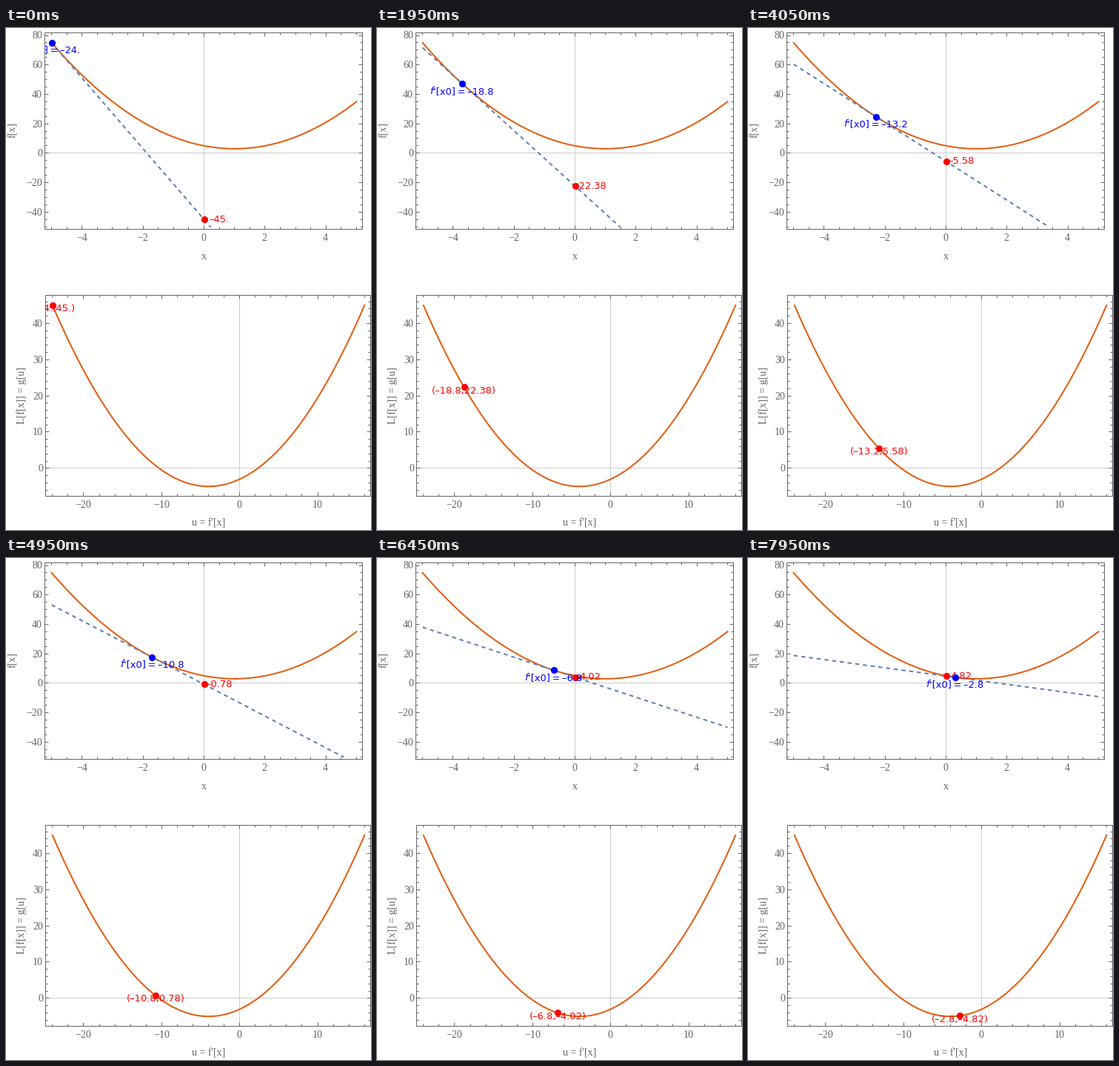
Write a matplotlib script that moves like this. It is 493 by 677 pixels and loops after 8000 ms.

```python
import matplotlib.pyplot as plt
import numpy as np
from matplotlib.animation import FuncAnimation
from matplotlib.ticker import MultipleLocator
from matplotlib.transforms import Affine2D

W, H, DPI = 493, 677, 64
PX = 72 / DPI  # points per pixel
GRAY, LIGHT = "#666666", "#cccccc"
ORANGE, STEEL = "#e65c0e", "#5e81b5"
FRAME_MS, LOOP_MS, STEP_MS = 50, 8000, 150
TANGENT_FLOOR = -50.3

plt.rcParams["font.family"] = "Liberation Serif"
plt.rcParams["axes.unicode_minus"] = True

fig = plt.figure(figsize=(W / DPI, H / DPI), dpi=DPI, facecolor="white")


def f(x):
    return 2 * x**2 - 4 * x + 5


def slope(x):
    return 4 * x - 4


def legendre(u):
    return (u + 4) ** 2 / 8 - 5


def number(value):
    """Short decimal with a trailing point on whole numbers and an en dash."""
    text = f"{round(value, 2):g}"
    return (text if "." in text else text + ".").replace("-", "\u2013")


def make_plot(box, origin, scale, x_steps, y_steps):
    """Framed axes; box and origin in stage pixels, scale in pixels per unit."""
    left, top, right, bottom = box
    (ox, oy), (sx, sy) = origin, scale
    ax = fig.add_axes([left / W, 1 - bottom / H, (right - left) / W, (bottom - top) / H])
    ax.set(xlim=((left - ox) / sx, (right - ox) / sx),
           ylim=((oy - bottom) / sy, (oy - top) / sy), facecolor="none")
    for axis, (major, minor) in ((ax.xaxis, x_steps), (ax.yaxis, y_steps)):
        axis.set_major_locator(MultipleLocator(major))
        axis.set_minor_locator(MultipleLocator(minor))
    for which, length in (("major", 5), ("minor", 3)):
        ax.tick_params(which=which, direction="in", top=True, right=True,
                       length=length * PX, width=PX, color=GRAY,
                       labelcolor=GRAY, labelsize=14 * PX)
    ax.tick_params(axis="x", pad=6 * PX)
    ax.tick_params(axis="y", pad=3 * PX)
    for spine in ax.spines.values():
        spine.set(color=GRAY, linewidth=PX)
    ax.axhline(0, color=LIGHT, lw=PX, zorder=0.5)
    ax.axvline(0, color=LIGHT, lw=PX, zorder=0.5)
    return ax


def axis_label(x, y, text, rotation=0):
    fig.text(x / W, 1 - y / H, text, color=GRAY, fontsize=14 * PX, rotation=rotation,
             ha="center", va="center")


def draw(ax, x, y, *style, **options):
    """Plot unsnapped at pixel centres, half a pixel right of and below the grid."""
    centred = ax.transData + Affine2D().translate(0.5, -0.5)
    return ax.plot(x, y, *style, transform=centred, snap=False, **options)[0]


def curve(ax, func, start, stop):
    x = np.linspace(start, stop, 200)
    draw(ax, x, func(x), color=ORANGE, lw=2 * PX, zorder=1)


def dot(ax, color, zorder):
    return draw(ax, [], [], "o", color=color, ms=9.2 * PX, mew=0, zorder=zorder)


def label(ax, color, zorder, dx=0.7):
    return ax.annotate("", (0, 0), xytext=(dx, -4), textcoords="offset pixels",
                       color=color, family="DejaVu Sans", fontsize=13 * PX,
                       ha="center", va="baseline", clip_on=True,
                       annotation_clip=False, zorder=zorder)


upper = make_plot((52, 6, 481, 271), (267, 168.3), (41.184, 1.985), (2, 0.5), (20, 5))
lower = make_plot((53, 360, 492, 631), (315.15, 593.3), (10.536, 4.885), (10, 2), (10, 2))

axis_label(267, 308, "x")
axis_label(9.7, 138, "f[x]", 90)
axis_label(274, 668, "u = f'[x]")
axis_label(21, 496, "L[f[x]] = g[u]", 90)

curve(upper, f, -5, 5)
curve(lower, legendre, -24, 16)
tangent = draw(upper, [], [], color=STEEL, lw=2 * PX, ls=(0, (2.75, 2.5)), zorder=2)

cut_label = label(upper, "red", 3)
cut_dot = dot(upper, "red", 4)
slope_label = label(upper, "blue", 5, dx=2.3)
upper.annotate("f", (0, 0), xycoords=slope_label, color="blue", family="DejaVu Sans",
               style="italic", fontsize=13 * PX, ha="right", va="bottom",
               clip_on=True, annotation_clip=False, zorder=5)
touch_dot = dot(upper, "blue", 6)
pair_label = label(lower, "red", 3)
pair_dot = dot(lower, "red", 4)


def update(frame):
    x0 = -5 + 0.1 * (frame * FRAME_MS // STEP_MS)
    u = slope(x0)
    cut = f(x0) - u * x0
    ends = np.array([-5, min(5, (TANGENT_FLOOR - cut) / u)])

    tangent.set_data(ends, cut + u * ends)
    touch_dot.set_data([x0], [f(x0)])
    cut_dot.set_data([0], [cut])
    pair_dot.set_data([u], [-cut])

    slope_label.xy = (x0, f(x0) - 5)
    slope_label.set_text(f"'[x0]\u2009=\u2009{number(u)}")
    cut_label.xy = (0.5, cut)
    cut_label.set_text(number(cut))
    pair_label.xy = (u, -cut - 1)
    pair_label.set_text(f"({number(u)},{number(-cut)})")
    return tangent, touch_dot, cut_dot, pair_dot, slope_label, cut_label, pair_label


animation = FuncAnimation(fig, update, frames=LOOP_MS // FRAME_MS, interval=FRAME_MS,
                          repeat=True, repeat_delay=0)
plt.show()
```
